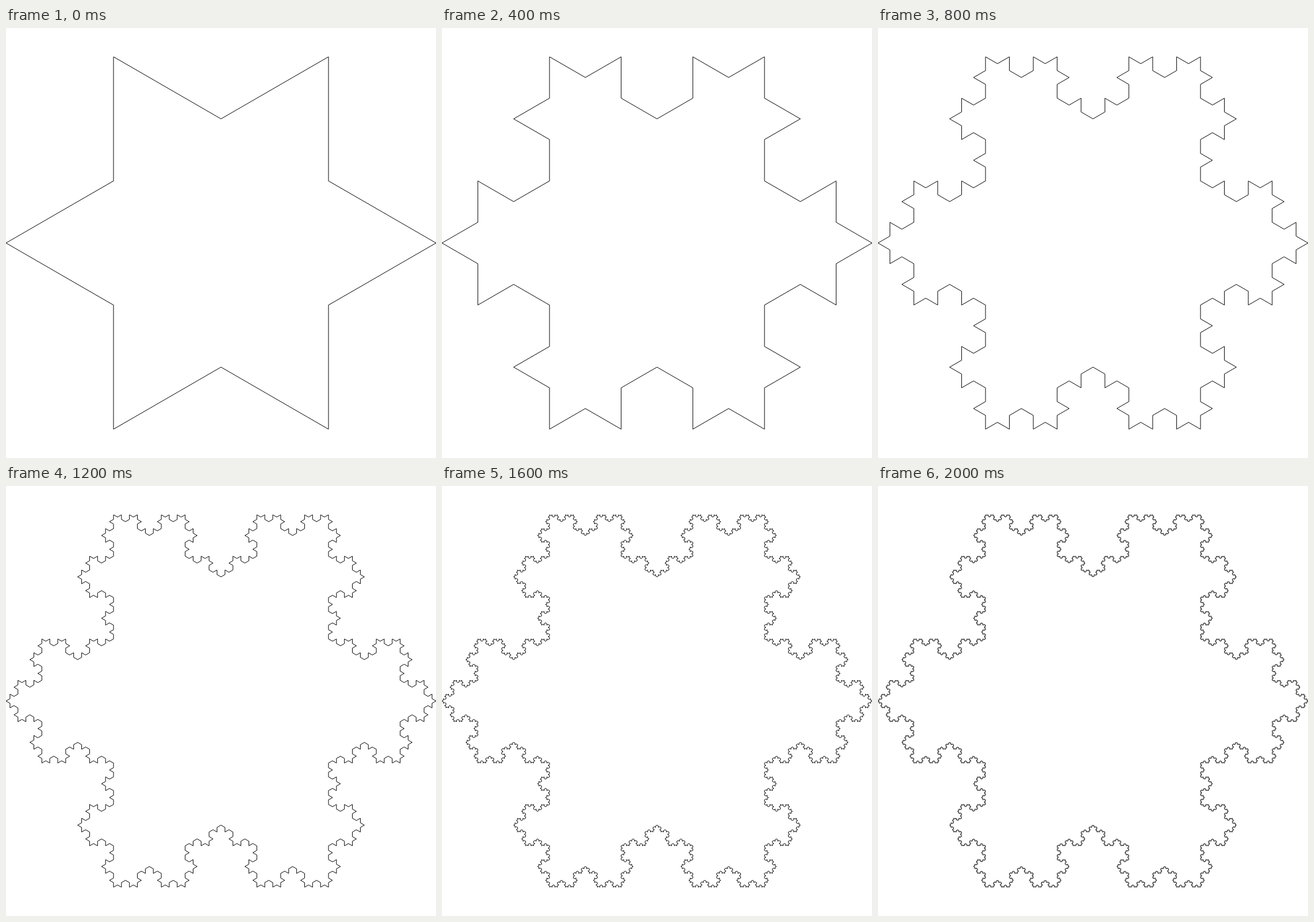
Animation of 748x748 px, one loop 2400 ms. Source, as an HTML page:

```html
<!DOCTYPE html>
<html lang="en">
<head>
<meta charset="utf-8">
<title>Koch snowflake</title>
<style>
  html, body { margin: 0; width: 100%; height: 100%; overflow: hidden; background: #fff; }
  svg { display: block; width: 748px; height: 748px; }
  path { fill: none; stroke: #000; stroke-width: 1; stroke-linejoin: miter; }
</style>
</head>
<body>
<svg viewBox="0 0 748 748"><path id="curve"/></svg>
<script>
const CENTER = 374, STEP_MS = 400, LEVELS = 6;
const SIN60 = Math.sqrt(3) / 2;
const curve = document.getElementById('curve');

// Six-pointed star: outer tips alternate with inner corners.
const star = Array.from({ length: 12 }, (_, i) => {
  const radius = i % 2 ? CENTER / Math.sqrt(3) : CENTER;
  const angle = i * Math.PI / 6;
  return [CENTER + radius * Math.cos(angle), CENTER + radius * Math.sin(angle)];
});

// Replace the middle third of every edge with an outward triangle.
const refine = points => points.flatMap(([x, y], i) => {
  const [nextX, nextY] = points[(i + 1) % points.length];
  const dx = (nextX - x) / 3, dy = (nextY - y) / 3;
  return [
    [x, y],
    [x + dx, y + dy],
    [x + 1.5 * dx + SIN60 * dy, y + 1.5 * dy - SIN60 * dx],
    [x + 2 * dx, y + 2 * dy]
  ];
});

const toPath = points =>
  'M' + points.map(p => p.map(v => v.toFixed(3)).join(' ')).join('L') + 'Z';

const paths = [];
for (let points = star; paths.length < LEVELS; points = refine(points)) {
  paths.push(toPath(points));
}

let shown = -1;
function draw(now) {
  const level = Math.floor(Math.max(0, now - start) / STEP_MS) % LEVELS;
  if (level !== shown) curve.setAttribute('d', paths[shown = level]);
  requestAnimationFrame(draw);
}
const start = performance.now();
draw(start);
</script>
</body>
</html>
```
